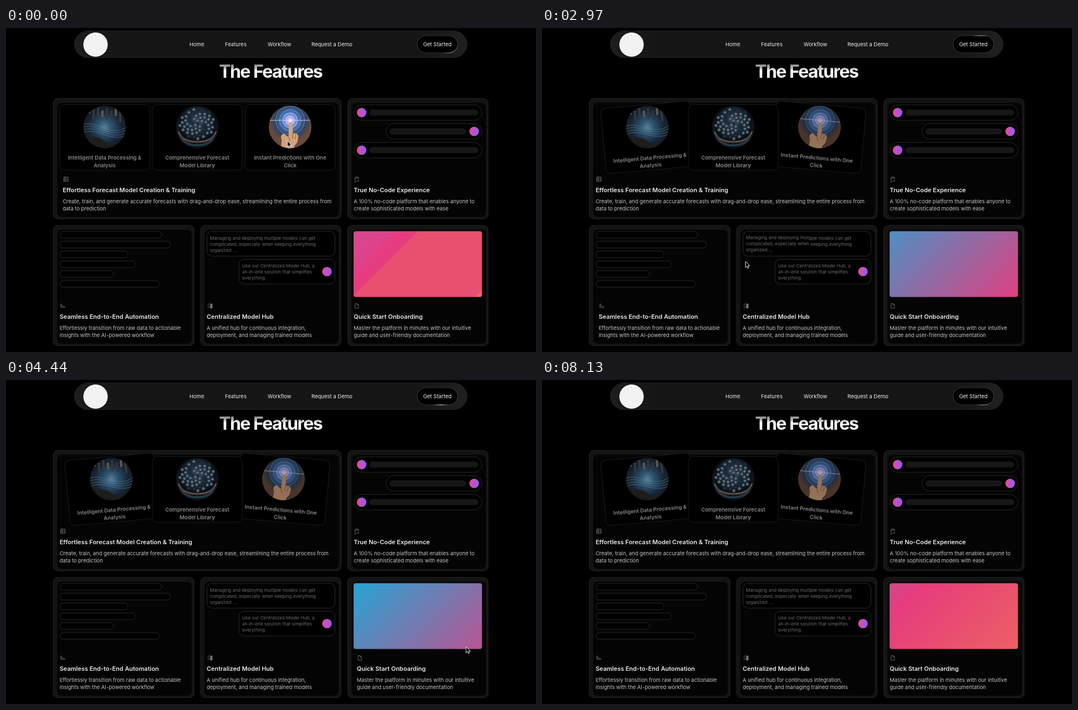
An HTML page that plays this animation: 956x586 px, repeating every 8150 ms.

```html
<!DOCTYPE html>
<html lang="en">
<head>
<meta charset="utf-8">
<title>Features</title>
<style>
html, body { margin: 0; width: 100%; height: 100%; overflow: hidden; background: #000; }
svg { display: block; font-family: Inter, "Open Sans", sans-serif; }
</style>
</head>
<body>
<svg id="stage" width="956" height="586" viewBox="0 0 956 586"></svg>
<script>
const LOOP = 8150, STEP = 147.8;

// ---------- markup helpers ----------
const rect = (x, y, w, h, r, fill, stroke = 'none', more = '') =>
  `<rect x="${x}" y="${y}" width="${w}" height="${h}" rx="${r}" fill="${fill}" stroke="${stroke}" ${more}/>`;
const circle = (x, y, r, fill, more = '') => `<circle cx="${x}" cy="${y}" r="${r}" fill="${fill}" ${more}/>`;
const line = (d, stroke, width = 1, more = '') =>
  `<path d="${d}" fill="none" stroke="${stroke}" stroke-width="${width}" ${more}/>`;
const text = (x, y, size, fill, str, more = '') =>
  `<text x="${x}" y="${y}" font-size="${size}" fill="${fill}" ${more}>${str.replace(/&/g, '&amp;')}</text>`;
const lines = (x, y, gap, size, fill, rows, more) =>
  rows.map((row, i) => text(x, y + i * gap, size, fill, row, more)).join('');
const group = (id, body, more = '') => `<g id="${id}" ${more}>${body}</g>`;
const stops = list => list.map(([at, color, alpha = 1]) =>
  `<stop offset="${at}" stop-color="${color}" stop-opacity="${alpha}"/>`).join('');
const ball = (x, y) => circle(x, y, 8.6, 'url(#ball)');
const EDGE = '#292929';

const defs = `<defs>
  <linearGradient id="ball">${stops([[0, '#ec4899'], [1, '#8b5cf6']])}</linearGradient>
  <linearGradient id="heading" gradientUnits="userSpaceOnUse" x1="0" y1="66" x2="0" y2="77">
    ${stops([[0, '#8a8a8a'], [.7, '#c4c4c4'], [1, '#fff']])}</linearGradient>
  <linearGradient id="bar">${stops([[0, '#1d1d1d'], [.12, '#151515'], [.88, '#151515'], [1, '#202020']])}</linearGradient>
  <linearGradient id="sweep" gradientUnits="userSpaceOnUse" x1="1439" y1="777.5" x2="739" y2="77.5">
    ${stops([[0, '#ee7752'], [.3333, '#e73c7e'], [.6667, '#23a6d5'], [1, '#23d5ab']])}</linearGradient>
  <linearGradient id="rest" gradientUnits="userSpaceOnUse" x1="627" y1="368" x2="802" y2="543">
    ${stops([[0, '#d6488f'], [.2, '#df428a'], [.25, '#e63c80'], [.33, '#e73c7e'], [.331, '#e94f71'],
      [.96, '#e94f71'], [.961, '#ec6263'], [1, '#ed6a5e']])}</linearGradient>
  <radialGradient id="glow" gradientUnits="userSpaceOnUse" cx="0" cy="0" r="1">
    ${stops([[0, '#fff'], [1, '#fff', 0]])}</radialGradient>
  <radialGradient id="photo0">${stops([[0, '#7db4d6'], [.35, '#3d6f96'], [.75, '#22364d'], [1, '#22252d']])}</radialGradient>
  <radialGradient id="photo1" cy=".4">${stops([[0, '#54708a'], [.5, '#2f475e'], [.85, '#1c2b3a'], [1, '#131a21']])}</radialGradient>
  <radialGradient id="photo2" cy=".35">${stops([[0, '#fff'], [.12, '#c4b4f4'], [.35, '#4a78c0'], [.7, '#2c4463'], [1, '#6a4a3a']])}</radialGradient>
  <clipPath id="round">${circle(0, 0, 38.5, '#000')}</clipPath>
</defs>`;

// ---------- pictures, drawn around 0,0 ----------
const dataScene = () => {
  let s = circle(0, 0, 39, 'url(#photo0)');
  for (let i = 0; i < 8; i++) s += rect(-30 + i * 8, -36 + (i * 5) % 9, 4, 11 + (i * 7) % 10, 0, i % 3 ? '#4a4e57' : '#8b7a70');
  for (let i = 0; i < 4; i++) s += line(`M-40 ${i * 5 - 4}C-15 ${-14 + i * 4} 8 ${20 + i * 3} 40 ${i * 5}`, '#8ccaf0', .8, 'opacity=".7"');
  return s + '<path d="M-40 24Q-15 10 0 27T40 20V40H-40Z" fill="#2c2a2c"/>';
};
const sphereScene = () => {
  let s = circle(0, 0, 39, '#151c25') + circle(0, -3, 33, 'url(#photo1)');
  for (let i = 0; i < 54; i++) {
    const a = i * 2.4, r = 4.4 * Math.sqrt(i);
    s += circle((Math.cos(a) * r).toFixed(1), (Math.sin(a) * r * .85 - 6).toFixed(1), 2.9, i % 4 ? '#8499ac' : '#2b4156', 'stroke="#1a2a39" stroke-width=".8"');
  }
  return s + line('M-34 8Q-28 27 0 27T34 8', '#92785f', 2.5) + line('M-31 16Q-24 33 0 33T31 16', '#39505f', 4);
};
const touchScene = () => {
  let s = circle(0, 0, 39, 'url(#photo2)');
  for (const r of [8, 13, 19, 26]) s += circle(0, -12, r, 'none', `stroke="#c5d8ff" stroke-width="${r < 15 ? 1.3 : .6}" opacity=".7"`);
  return s + line('M-38-12H38', '#f0d9ff', 1, 'opacity=".8"') +
    '<path d="M-2-6Q1-10 4-6L5 12Q13 10 15 17L13 28Q8 32 6 40H-17L-15 24Q-19 16-12 12L-3 18Z" fill="#d3a27b"/>' +
    line('M5 12L4 22M10 13L9 22M-3 18L0 26', '#85573e', 1);
};

// ---------- page parts ----------
const header =
  rect(123.5, 5.5, 708, 48, 24, 'url(#bar)', '#222') +
  circle(161.5, 30, 22, '#f2f2f2') +
  [[331, 'Home'], [395, 'Features'], [472, 'Workflow'], [551, 'Request a Demo']]
    .map(([x, s]) => text(x, 32.7, 9.5, '#ececec', s)).join('') +
  rect(741, 13.5, 74, 32, 16, '#333') +
  rect(741, 13.5, 74, 32, 16, 'url(#glow)') +
  rect(742.1, 14.6, 71.8, 29.8, 14.9, '#000') +
  text(778, 32.7, 9.5, '#f2f2f2', 'Get Started', 'text-anchor="middle"') +
  text(384.2, 90.3, 32, 'url(#heading)', 'The Features', 'font-weight="700" letter-spacing="-1.55"');

const panel = (x, y, w) =>
  rect(x + .5, y + .5, w - 1, 217.5, 8, '#131313', '#242424') +
  rect(x + 7.5, y + 8.5, w - 12, 206, 8, '#040404');

const icons = [
  line('M1.5 .5H9.5V8.5H1.5ZM4.2 .5V8.5M4.2 3.2H9.5M4.2 5.8H9.5M1.5 3.2H4.2M1.5 5.8H4.2', '#777', .8),
  line('M3.5 1.3H2V9.5H5M7 1.3H8.5V4.5M3.5 .3H7V2.3H3.5ZM6 7.5H9M7.5 6L9 7.5 7.5 9', '#777', .8),
  line('M1 7.5H10M1 5.5Q3-2 3 2T2 6Q5 2 5 6Q6 4 7 5.5H9', '#777', .8),
  line('M2 .5V9M4 .5V9', '#777', 1, 'stroke-dasharray="1 1"') + rect(6, .5, 4, 8.5, .5, '#777'),
  line('M2 .5H5.8L8.3 3V9H2ZM5.8 .5V3H8.3', '#777', .8)
];
const copy = (i, x, y, title, rows) => group('copy' + i,
  `<g transform="translate(${x + .3} ${y - 28})">${icons[i]}</g>` +
  text(x, y, 10.96, '#e8e8e8', title, 'font-weight="600"') +
  lines(x, y + 19.7, 13.7, 9.43, '#c4c4c4', rows));

const mini = (i, x, scene, rows) => group('mini' + i,
  rect(x, 138.5, 162, 118.5, 9, '#000', '#1b1b1b') +
  `<g id="photo${i}pic" transform="translate(${x + 81} 179)" clip-path="url(#round)">${scene()}</g>` +
  lines(x + 81, 238.3, 13.6, 9.59, '#878787', rows, 'font-weight="600" text-anchor="middle"'));

const chat = (i, x, y, right) => {
  const w = 858 - x;
  return group('chat' + i, rect(x, y, w, 28, 14, '#000', EDGE) +
    ball(right ? 844.5 : x + 14, y + 14) +
    rect(right ? x + 6 : x + 28, y + 8.6, w - 34, 11, 5.5, '#171717'));
};

const barWidths = [184, 200, 123, 137, 97, 179.5];

stage.innerHTML = defs + header +
  panel(85, 127, 520) + panel(616, 127, 254) +
  panel(85, 356.5, 254.5) + panel(350.5, 356.5, 254) + panel(616, 356.5, 254) +
  mini(0, 97, dataScene, ['Intelligent Data Processing &', 'Analysis']) +
  mini(2, 431.5, touchScene, ['Instant Predictions with One', 'Click']) +
  mini(1, 264, sphereScene, ['Comprehensive Forecast', 'Model Library']) +
  chat(0, 627.5, 139) + chat(1, 685.5, 173, true) + chat(2, 627.5, 207) +
  barWidths.map((w, i) => rect(97, 368 + i * 17.75, w, 12, 6, '#000', EDGE, `id="track${i}"`)).join('') +
  group('note0', rect(362.5, 368, 230.5, 44.5, 9, '#000', EDGE) +
    lines(368, 382.5, 11, 8.2, '#6c6c6c', ['Managing and deploying multiple models can get',
      'complicated, especially when keeping everything', 'organized ...'])) +
  group('note1', rect(420.5, 418.5, 172.5, 44.5, 9, '#000', EDGE) + ball(579, 440.5) +
    lines(426, 433, 11, 8.2, '#6c6c6c', ['Use our Centralized Model Hub, a',
      'all-in-one solution that simplifies', 'everything'])) +
  rect(627, 367.6, 231.5, 119, 4, 'url(#rest)', 'none', 'id="swatch"') +
  copy(0, 96.7, 297, 'Effortless Forecast Model Creation & Training',
    ['Create, train, and generate accurate forecasts with drag-and-drop ease, streamlining the entire process from', 'data to prediction']) +
  copy(1, 627.3, 297, 'True No-Code Experience',
    ['A 100% no-code platform that enables anyone to', 'create sophisticated models with ease']) +
  copy(2, 96.7, 526, 'Seamless End-to-End Automation',
    ['Effortlessly transition from raw data to actionable', 'insights with the AI-powered workflow']) +
  copy(3, 362, 526, 'Centralized Model Hub',
    ['A unified hub for continuous integration,', 'deployment, and managing trained models']) +
  copy(4, 627.3, 526, 'Quick Start Onboarding',
    ['Master the platform in minutes with our intuitive', 'guide and user-friendly documentation']) +
  group('arrow', '<path d="M0 0V11L2.6 8.6 4.3 12.4 6 11.6 4.4 7.9H7.8Z" fill="#000" stroke="#fff" stroke-width=".9"/>') +
  group('beam', line('M-3-6Q0-6 0-4Q0-6 3-6M0-4V4M-3 6Q0 6 0 4Q0 6 3 6M-1.5 1H1.5', '#ddd', 2.4) +
    line('M-3-6Q0-6 0-4Q0-6 3-6M0-4V4M-3 6Q0 6 0 4Q0 6 3 6M-1.5 1H1.5', '#111', .8));

// ---------- motion ----------
const $ = id => document.getElementById(id);
const set = (id, name, value) => $(id).setAttribute(name, value);
const clamp = v => Math.max(0, Math.min(1, v));
const smooth = v => (v = clamp(v)) * v * (3 - 2 * v);
const mix = (a, b, k) => a + (b - a) * k;
// 1 while hovered between two times, eased in and out
const hover = (t, from, to, d = 200) => smooth((t - from) / d) - smooth((t - to) / d);

// time, x, y of the pointer
const path = [[0, 507.5, 204], [250, 520, 204], [620, 740, 200], [1000, 720, 210], [1190, 359.5, 333.5],
  [1650, 210, 420], [2450, 230, 440], [2820, 310, 430], [2970, 368.5, 422], [3570, 462, 435], [3850, 470, 440],
  [4440, 830, 482.5], [4700, 826, 470], [5200, 895, 490], [5780, 910, 508], [6370, 910, 466],
  [6950, 909, 480], [7250, 912, 500], [7700, 930, 600], [LOOP, 930, 600]];
const pointer = t => {
  const i = path.findIndex(p => p[0] > t), [t0, x0, y0] = path[i - 1], [t1, x1, y1] = path[i];
  const k = smooth((t - t0) / (t1 - t0));
  return [mix(x0, x1, k), mix(y0, y1, k)];
};

// glow centre on each side of the button: top, right, bottom, left
const sides = [[778, 13.5], [815, 29.5], [778, 45.5], [741, 29.5]];

const tilt = (id, k, dx, angle, cx, cy) =>
  set(id, 'transform', `translate(${dx * k} 0) rotate(${angle * k} ${cx} ${cy})`);

function draw(t) {
  const shift = [hover(t, -999, 500) + hover(t, 1045, 1320), hover(t, 500, 1045),
    hover(t, 1440, 2975), hover(t, 2950, 4060), hover(t, 4100, 5020)];
  shift.forEach((k, i) => set('copy' + i, 'transform', `translate(${5.5 * k} 0)`));

  const fan = smooth((t - 500) / 350);
  tilt('mini0', fan, 13.6, -5, 178, 198);
  tilt('mini2', fan, -13.6, 5, 512.5, 198);
  [0, 1, 2].forEach(i => set(`photo${i}pic`, 'opacity', i == 2 ? mix(.7, 1, hover(t, -999, 300)) : .7));

  const talk = hover(t, 450, 930);
  tilt('chat0', talk, 6.8, 5, 743, 153);
  tilt('chat1', talk, -6.8, -5, 772, 187);
  tilt('chat2', talk, 6.8, 5, 743, 221);

  const grow = t < 1440 ? 1 : smooth((t - 1440) / 1200);
  barWidths.forEach((w, i) => set('track' + i, 'width', Math.min(w, Math.max(1, 238 * grow))));

  const note = hover(t, 2950, 4060, 280);
  tilt('note0', note, 6.8, 5, 477.7, 390);
  tilt('note1', note, -6.8, -5, 506.7, 440.7);

  const pos = clamp(Math.abs(t - 3795) / 1500);
  set('swatch', 'fill', t < 2295 ? 'url(#rest)' : 'url(#sweep)');
  set('sweep', 'gradientTransform', `translate(${-693 * pos} 0)`);

  const turn = 1.4 + t / 1000, n = Math.floor(turn);
  const [ax, ay] = sides[n % 4], [bx, by] = sides[(n + 1) % 4];
  set('glow', 'gradientTransform', `translate(${mix(ax, bx, turn - n)} ${mix(ay, by, turn - n)}) scale(15 15)`);

  const [x, y] = pointer(t);
  const onText = x > 425 && x < 555 && y > 425 && y < 456;
  set('arrow', 'display', onText ? 'none' : 'inline');
  set('beam', 'display', onText ? 'inline' : 'none');
  set(onText ? 'beam' : 'arrow', 'transform', `translate(${x} ${y})`);
}

function tick() {
  // the picture advances in even steps
  draw(Math.floor((performance.now() % LOOP + 4) / STEP) * STEP);
  requestAnimationFrame(tick);
}
tick();
</script>
</body>
</html>
```
